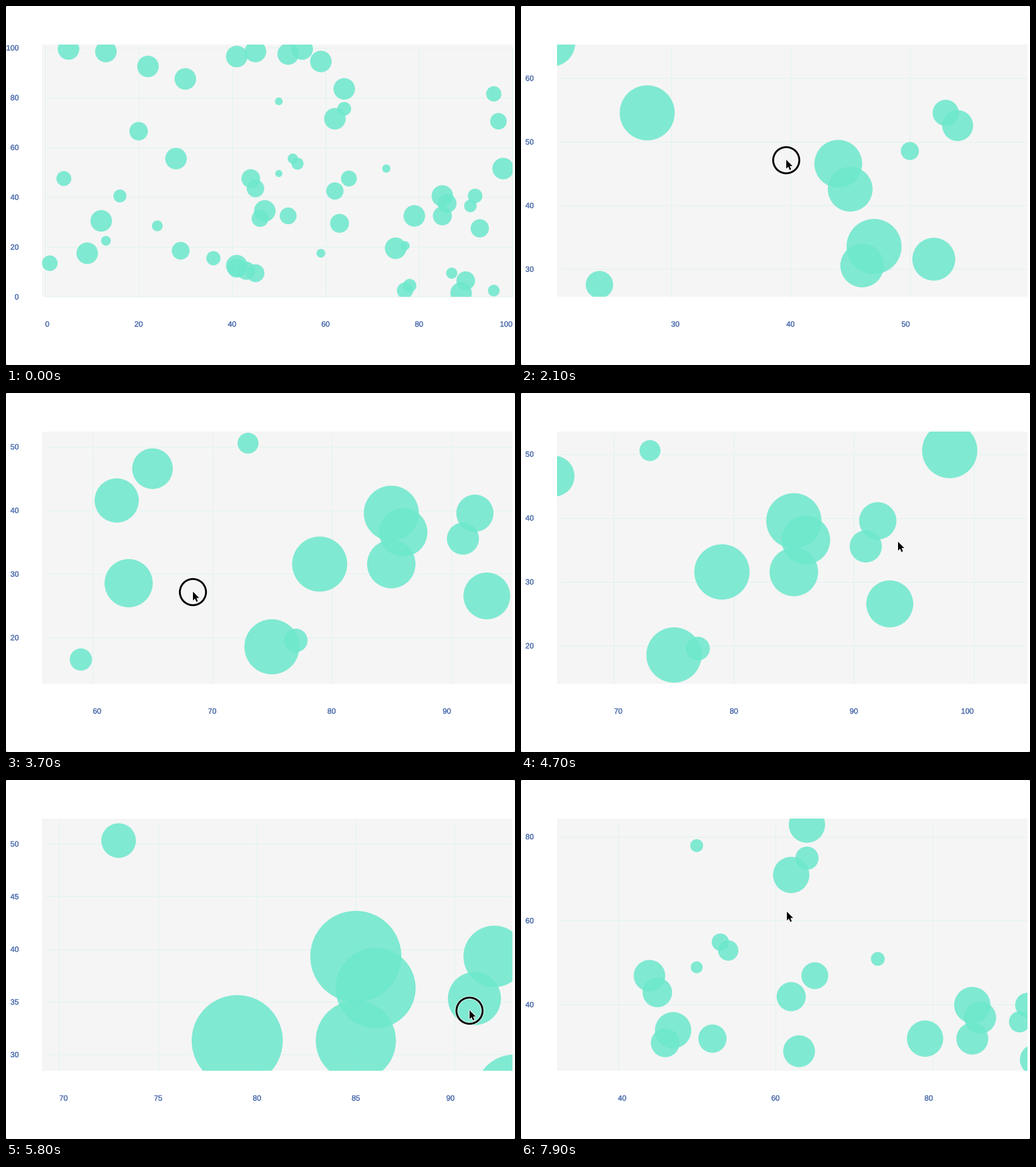
Recreate the animation shown at these times as a matplotlib script. Size 806 px wide and 568 px high, loop 8000 ms.

```python
import math

import matplotlib.pyplot as plt
from matplotlib.animation import FuncAnimation
from matplotlib.patches import Circle, Polygon, Rectangle
from matplotlib.patheffects import withStroke

W, H, DPI = 806, 568, 80
PX = 72 / DPI  # one pixel in points
LEFT, RIGHT, TOP, BOTTOM = 57, 802, 61, 460
X0, Y0, SX, SY = 62, 460, 7.4, -3.94  # unzoomed axes
MINT, GRID, INK = "#6ce8cc", "#dff4ef", "#5574b2"

plt.rcParams.update({"font.family": "Liberation Sans", "text.hinting": "none",
                     "toolbar": "None"})

# Scatter data, ordered from the smallest bubble to the largest
POINTS = [
    (50, 49), (50, 78), (73, 51), (59, 17), (77, 20), (13, 22), (53, 55), (24, 28),
    (87, 9), (96, 2), (54, 53), (91, 36), (16, 40), (78, 4), (64, 75), (36, 15),
    (92, 40), (4, 47), (96, 81), (1, 13), (65, 47), (77, 2), (97, 70), (52, 32),
    (46, 31), (62, 42), (45, 43), (29, 18), (45, 9), (43, 10), (93, 27), (20, 66),
    (90, 6), (44, 47), (41, 11), (63, 29), (86, 37), (85, 32),
    (5, 99), (13, 98), (22, 92), (30, 87), (41, 96), (45, 98), (52, 97), (55, 99),
    (59, 94), (64, 83), (62, 71), (98, 51), (28, 55), (12, 30), (9, 17), (41, 12),
    (47, 34), (75, 19), (79, 32), (85, 40), (89, 1)]
GROWING, R_MAX = 38, 17.05  # bubbles from this rank on have the full size


def radius(rank):
    if rank >= GROWING:
        return R_MAX
    return 5.6 + 9.4 * (1 - (1 - rank / (GROWING - 1)) ** 1.75)


# The pointer's legs: end time (ms), end position, mode, end zoom
legs = []


def leg(t, x, y, mode="move", k=None):
    legs.append((t, x, y, mode, k))


def zoom(start, end, x, y, k):
    leg(start, x, y)
    leg(end, x, y, "zoom", k)


def pan(start, end, x, y, dx, dy, strokes=1):
    """Drag the view by (dx, dy) in equal strokes that each end at (x, y)."""
    span = (end - start) / strokes
    for i in range(strokes):
        t = start + i * span
        leg(t + (.25 * span if i else 0), x - dx / strokes, y - dy / strokes)
        leg(t + span, x, y, "drag")


leg(100, 640, 595)
zoom(600, 1500, 313.8, 294, 2.555)
pan(1950, 2500, 420, 244, 0, 0)
pan(2750, 3700, 296, 315, -667.4, -129.9, strokes=2)
pan(3700, 4000, 118.6, 327.2, -177.4, 12.2)
zoom(4672, 5200, 597, 236, 4.23)
pan(5350, 5800, 734, 365, 228.9, 94.9)
pan(5800, 6000, 790, 491, 56, 126)
pan(6200, 7000, 568, 216, 393.2, 188.8, strokes=2)
pan(7000, 7200, 723, 209.3, 155, -6.7)
zoom(7450, 7900, 421, 209, 1.685)


def smooth(u):
    return u * u * (3 - 2 * u)


def state(ms):
    """Zoom, pan, pointer position and button at a given time."""
    t0, px, py = legs[0][:3]
    k, tx, ty, down = 1, 0, 0, False
    for t1, x1, y1, mode, k1 in legs[1:]:
        if ms <= t0:
            break
        u = min(1, (ms - t0) / max(1, t1 - t0))
        down = mode == "drag"
        if not down:
            u = smooth(u)
        x, y = px + (x1 - px) * u, py + (y1 - py) * u
        if down:
            tx, ty = tx + x - px, ty + y - py
        elif mode == "zoom":
            ratio = (k1 / k) ** u
            tx, ty = x - (x - tx) * ratio, y - (y - ty) * ratio
            k *= ratio
        t0, px, py = t1, x, y
    return k, tx, ty, px, py, down


def ticks(lo, hi, count=4):
    raw = (hi - lo) / count
    step = 10 ** math.floor(math.log10(raw))
    step *= max([1] + [m for m in (2, 5, 10) if (raw / step) ** 2 >= m * m / 2])
    first, last = math.ceil(lo / step - 1e-6), math.floor(hi / step + 1e-6)
    return [i * step for i in range(first, last + 1)]


fig = plt.figure(figsize=(W / DPI, H / DPI), dpi=DPI, facecolor="white")
ax = fig.add_axes([0, 0, 1, 1])
ax.set(xlim=(0, W), ylim=(H, 0))
ax.axis("off")


def add(patch):
    return ax.add_patch(patch)


plot = add(Rectangle((LEFT, TOP), RIGHT - LEFT, BOTTOM - TOP, fc="#f5f5f5", lw=0))
for cx in (0, W - 1):
    for cy in (0, H - 1):
        add(Rectangle((cx, cy), 1, 1, fc="#666666", lw=0))


def axis_slots(n=9):
    bolder = [withStroke(linewidth=.35 * PX, foreground=INK)]
    return [(ax.plot([], [], color=GRID, lw=PX, zorder=2)[0],
             ax.text(0, 0, "", color=INK, size=12 * PX, path_effects=bolder))
            for _ in range(n)]


x_slots, y_slots = axis_slots(), axis_slots()
dots = [add(Circle((0, 0), 1, fc=MINT, alpha=.85, lw=0, zorder=3)) for _ in POINTS]
for dot in dots:
    dot.set_clip_path(plot)

halo = add(Circle((0, 0), 20.7, fill=False, ec="white", lw=5 * PX, alpha=.75, zorder=5))
ring = add(Circle((0, 0), 20.7, fill=False, ec="black", lw=3 * PX, zorder=6))
ARROW = [(0, 0), (0, 14), (3.2, 11), (5.5, 16.2), (7.8, 15.2), (5.6, 10), (10, 10)]
outline = add(Polygon(ARROW, fc="white", ec="white", lw=2 * PX, zorder=7))
arrow = add(Polygon(ARROW, fc="black", lw=0, zorder=8))


def fill(slots, values, place):
    for i, (line, text) in enumerate(slots):
        shown = i < len(values)
        line.set_visible(shown)
        text.set_visible(shown)
        if shown:
            text.set_text(f"{values[i]:g}")
            place(i, values[i], line, text)


def draw(frame):
    k, tx, ty, px, py, down = state(frame * 100)

    def sx(v):
        return k * (X0 + SX * v) + tx

    def sy(v):
        return k * (Y0 + SY * v) + ty

    xs = ticks(*(((x - tx) / k - X0) / SX for x in (X0, RIGHT)))
    ys = ticks(*(((y - ty) / k - Y0) / SY for y in (Y0, 66)))

    # End labels are anchored inwards, the others are centred
    def place_x(i, v, line, text):
        line.set_data([sx(v)] * 2, [TOP + 4, BOTTOM])
        text.set_ha("left" if i == 0 else "right" if i == len(xs) - 1 else "center")
        text.set_position((sx(v), 507.3))

    def place_y(_, v, line, text):
        line.set_data([X0, RIGHT], [sy(v)] * 2)
        text.set_ha("right")
        text.set_position((20.3, sy(v) + 4.3))

    fill(x_slots, xs, place_x)
    fill(y_slots, ys, place_y)

    drop = 4.15 * k - 6  # bubbles sit slightly off the y axis
    for rank, (dot, (x, y)) in enumerate(zip(dots, POINTS)):
        dot.set_center((sx(x), sy(y) + drop))
        dot.set_radius(radius(rank) * k)

    for p in (halo, ring):
        p.set_center((px, py))
        p.set_visible(down)
    for p in (outline, arrow):
        p.set_xy([(px + x, py + y - .7) for x, y in ARROW])
    return []


anim = FuncAnimation(fig, draw, frames=80, interval=100, repeat=True,
                     repeat_delay=0, init_func=lambda: draw(0), blit=False)
plt.show()
```
